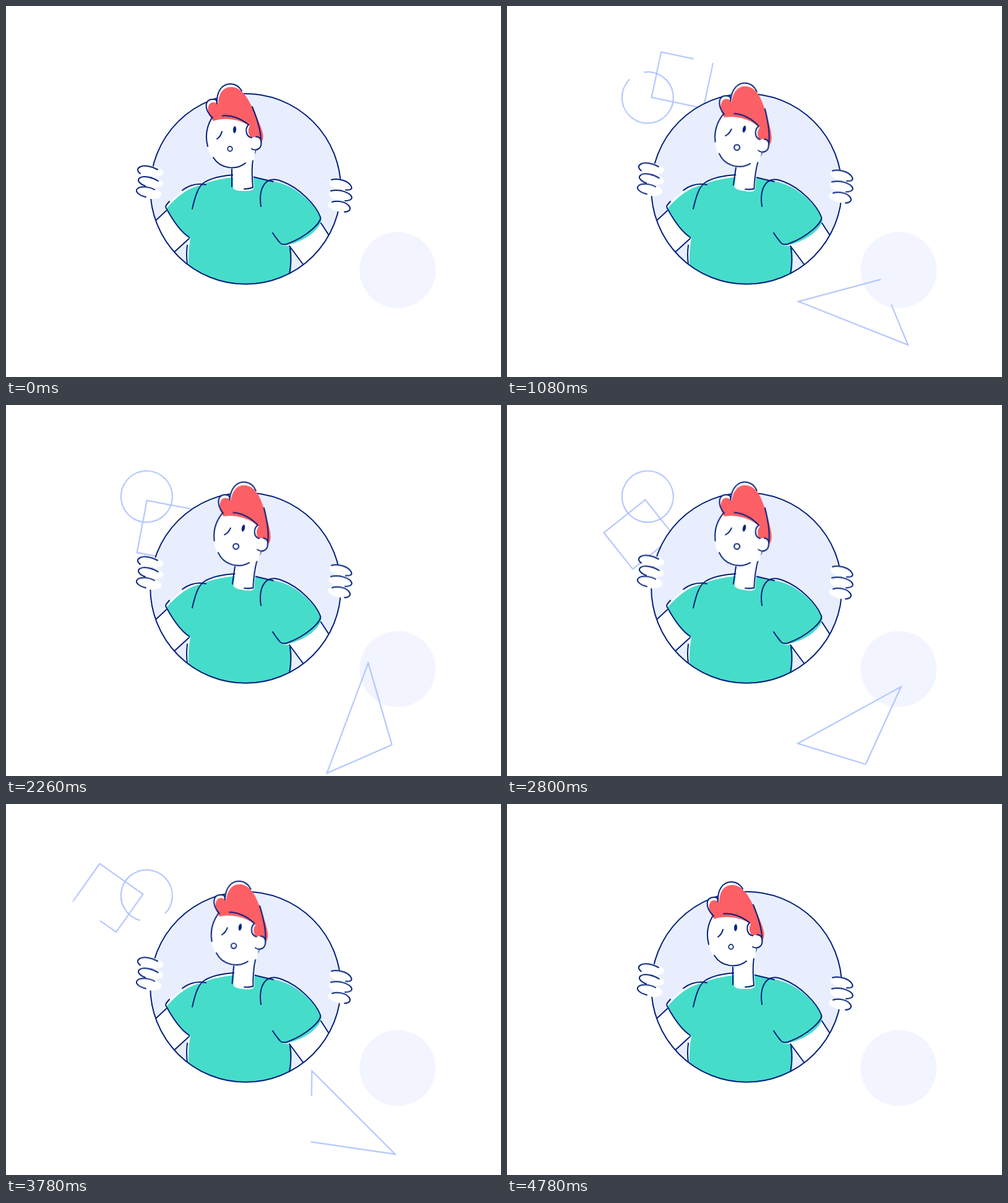
These frames come from a looping animation (800x600 px, 4800 ms). An HTML page:

```html
<!DOCTYPE html>
<html lang="en">
<head>
<meta charset="utf-8">
<title>Peeking through</title>
<style>
  html, body { margin: 0; width: 100%; height: 100%; overflow: hidden; background: #fff; }
  svg { display: block; width: 100vw; height: 100vh; }

  .line { fill: none; stroke: #02207a; stroke-width: 2; stroke-linecap: round; stroke-linejoin: round; }
  .white { fill: #fff; }
  .teal { fill: #46dcca; }
  .red { fill: #fd5f66; }
  .ink { fill: #02207a; }

  .trace {
    fill: none; stroke: #adc1fd; stroke-width: 2; stroke-miterlimit: 10;
    stroke-dasharray: 100 102;
    animation: trace 4.8s linear infinite;
  }
  .spin { animation: spin 4.8s linear infinite; }
  .head { transform-origin: 383px 297px; animation: tilt 4.8s cubic-bezier(.2, .1, .1, 1) infinite; }
  .mouth { transform-origin: 362px 231px; animation: gasp 4.8s cubic-bezier(.2, .1, .1, 1) infinite; }
  .left { animation: left 4.8s linear infinite; }
  .right { animation: right 4.8s linear infinite; }

  @keyframes spin { to { transform: rotate(361.5deg); } }
  @keyframes trace {
    0%, 99.58%, 100% { stroke-dashoffset: 100.2; }
    25%, 74.58% { stroke-dashoffset: 0; }
  }
  @keyframes tilt {
    0%, 99.58%, 100% { transform: rotate(0deg); }
    25%, 74.58% { transform: rotate(8.2deg); }
  }
  @keyframes gasp {
    0%, 99.58%, 100% { transform: scale(1); }
    25%, 74.58% { transform: scale(1.18); }
  }
  @keyframes left {
    0%, 100% { transform: translateY(0); }
    22.5% { transform: translateY(-4.7px); }
    35.8% { transform: translateY(-11px); }
    58.3% { transform: translateY(-15.5px); }
    71.2% { transform: translateY(-14px); }
    86.2% { transform: translateY(-7px); }
  }
  @keyframes right {
    0%, 100% { transform: translateY(0); }
    22.5% { transform: translateY(-14.5px); }
    35.8% { transform: translateY(-21.5px); }
    45% { transform: translateY(-22px); }
    58.3% { transform: translateY(-19.5px); }
    71.2% { transform: translateY(-14.5px); }
    86.2% { transform: translateY(-7px); }
  }
</style>
</head>
<body>
<svg viewBox="0 0 800 600">
  <defs>
    <clipPath id="hole"><circle cx="387.200" cy="295.800" r="154"/></clipPath>
  </defs>

  <circle cx="633" cy="427" r="61.5" fill="#f2f5ff"/>

  <!-- Spinning outlines -->
  <g transform="translate(227.3 148.1)">
    <g class="spin">
      <path class="trace" pathLength="100" d="M-41.5 0A41.5 41.5 0 1 1 41.5 0A41.5 41.5 0 1 1 -41.5 0"/>
      <path class="trace" pathLength="100" transform="rotate(-69.5)" d="M91.8 -76.6V-1.6H6.2V-76.6Z"/>
    </g>
  </g>
  <g transform="translate(559.2 505.8)">
    <g class="spin">
      <path class="trace" pathLength="100" transform="rotate(-81.3)" d="M45 -63.7L-88.2 -27.7L89 42.3Z"/>
    </g>
  </g>

  <circle cx="387.200" cy="295.800" r="154" fill="#e9eeff"/>

  <!-- Body -->
  <g clip-path="url(#hole)">
    <path class="white" d="M259 328L225 363L255 413L297 376Z"/>
    <path class="white" d="M509 350L540 400L497 441L458 387L447 386Z"/>
    <path class="white" d="M258 325C274 306 296 288 322 288Q340 276 367 274L400 278L432 284L440 460H293V387L296 374C283 364 271 346 258 325Z"/>
    <path class="teal" d="M259 328C272 313 290 295 314 290Q337 280 367 277L401 278C412 279 423 281 433 284C466 289 497 318 509 342C514 352 491 382 445 388L460 388C463 402 462 418 460 433L440 460H310L295 419Q294 396 298 376C283 368 272 350 259 328Z"/>
    <g class="line">
      <path d="M264 316L259 322Q257 325 260 329C270 347 282 365 296 374"/>
      <path d="M285 298Q302 285 323 289"/>
      <path d="M301 328C306 306 311 291 321 285C334 277 350 274 372 273"/>
      <path d="M398 276Q414 280 432 284"/>
      <path d="M412 324C409 304 413 288 425 282C433 279 439 281 447 284C474 294 501 322 508 341C511 349 487 373 454 385Q446 387 442 382Q436 375 431 367"/>
      <path d="M243 346L259 331M273 397L296 376M293 387Q291 402 293 418"/>
      <path d="M509 351L522 371M458 388L481 419M459 391Q462 413 458 433"/>
    </g>
  </g>
  <circle class="line" cx="387.200" cy="295.800" r="154"/>

  <!-- Neck and head -->
  <g class="head">
    <path class="white" d="M367 250V293Q367 299 383 299Q401 300 401 293Q398 270 402 236Z"/>
    <path class="line" d="M365 264V292M403 235C397 248 397 272 399 293.500Q392 296 385 296"/>

    <path class="white" d="M333 180C321 195 321 222 331 241C345 265 373 267 388 253L401 249L403 232L402 195L380 160Z"/>
    <path class="white" d="M334 181C318 167 320 150 336 151L341 158C338 138 348 126 363 126Q374 126 382 137L360 165Z"/>
    <path class="red" d="M335 186C328 178 324 167 328 160C331 154 339 155 343 159C343 141 352 130 365 131C380 132 389 146 396 160C405 179 414 197 415.500 209Q416 216 413 221L398 214C391 209 390 200 394 194C379 184 355 179 335 186Z"/>
    <circle class="white" cx="403.500" cy="222" r="10.500"/>

    <g class="line">
      <path d="M334 181C319 168 320 148 338 151Q341 152 341 158C340 138 349 126 363 126Q374 126 381 137"/>
      <path d="M350 177.500C364 176 380 182 392 192C386 198 387 211 397 213"/>
      <path d="M398 163C405 180 411 197 412 215"/>
      <path d="M404 211.500C410 211 413 216 412.500 223C412 231 404 235 397 231"/>
      <path d="M332 182C324 196 322 212 326 227M335 245C347 264 372 266 387 254"/>
      <path d="M349 203Q347 211 341 215"/>
      <circle class="mouth" cx="362" cy="231" r="3.800" stroke-width="1.700"/>
    </g>
    <ellipse class="ink" cx="369.500" cy="200" rx="2.500" ry="5.700" transform="rotate(4 369.500 200)"/>
  </g>

  <!-- Hands -->
  <g class="left">
    <g class="white">
      <ellipse cx="235" cy="267.500" rx="19.500" ry="8.500" transform="rotate(9 235 267.500)"/>
      <ellipse cx="235" cy="285" rx="19.500" ry="8.500" transform="rotate(9 235 285)"/>
      <ellipse cx="232" cy="302.500" rx="19.500" ry="9" transform="rotate(9 232 302.500)"/>
    </g>
    <g class="line">
      <path d="M245 264.500C235 259 223 257 217 260C211 263 212 267 217 271"/>
      <path d="M246 283C237 277 223 274 217 277.500C210 281 216 288 225 291"/>
      <path d="M240 297C231 292 218 291 213 295C207 299 214 306 226 309"/>
    </g>
  </g>
  <g class="right">
    <g class="white">
      <ellipse cx="541" cy="288.500" rx="18.500" ry="8.500" transform="rotate(12 541 288.500)"/>
      <ellipse cx="540" cy="306.500" rx="18.500" ry="9" transform="rotate(12 540 306.500)"/>
      <ellipse cx="538.500" cy="324" rx="18.500" ry="8.500" transform="rotate(12 538.500 324)"/>
    </g>
    <g class="line">
      <path d="M526 281C538 278 552 283 557 290C561 296 557 298 549 297.500"/>
      <path d="M525 299C537 296 551 300 557 306C562 312 556 315 548 315"/>
      <path d="M527 317C537 314 549 317 554 323C559 329 554 333 547 333"/>
    </g>
  </g>
</svg>
</body>
</html>
```
